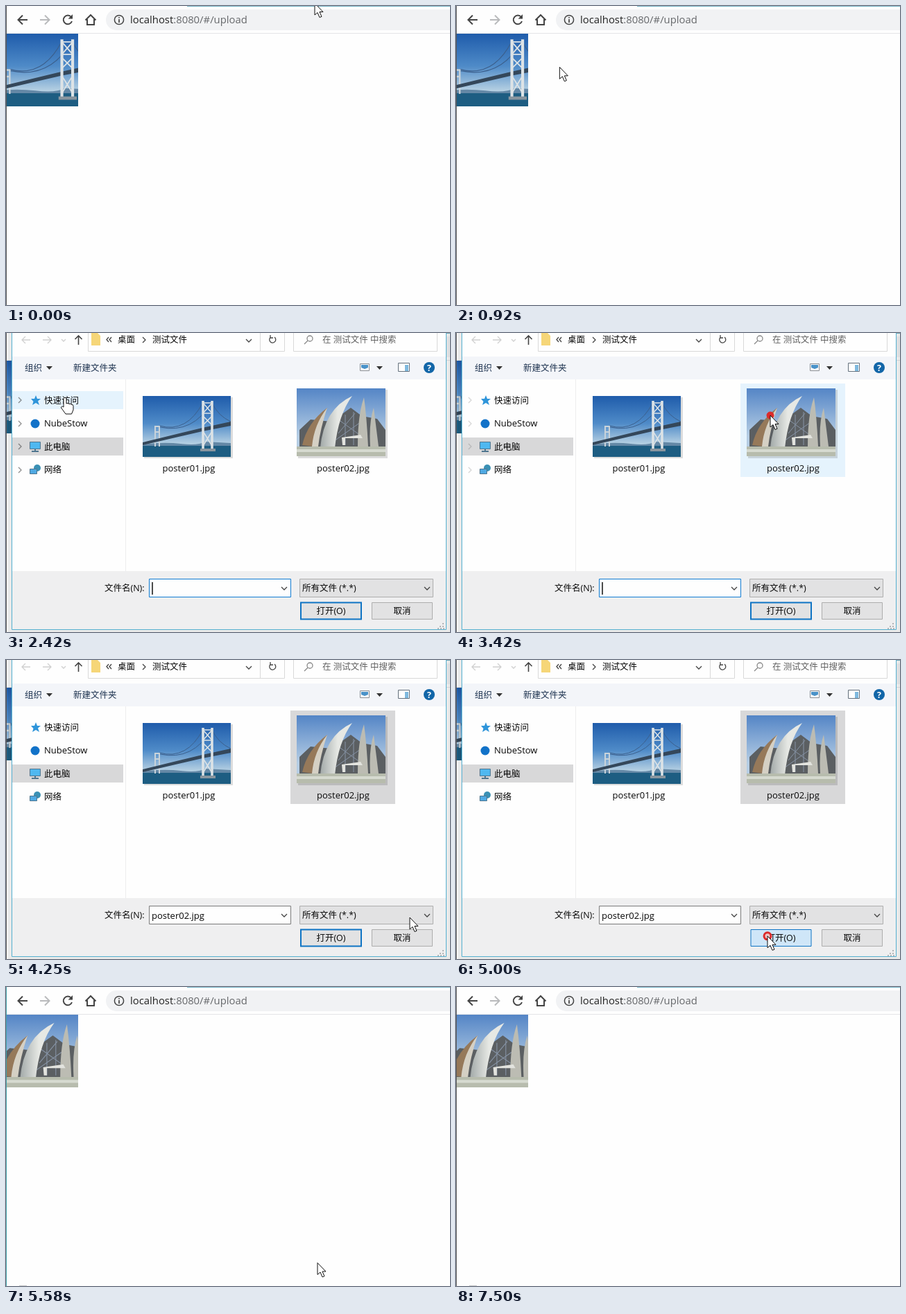
An HTML page for the animation above (7.58 s loop, 640 px wide and 432 px high).

```html
<!DOCTYPE html>
<html lang="zh-CN">
<head>
<meta charset="utf-8">
<title>Upload</title>
<style>
html, body { margin: 0; height: 100%; overflow: hidden; background: #fefefe; }
svg { display: block; }
text { font: 12.5px "Open Sans", "Noto Sans CJK SC", "Noto Sans CJK", sans-serif; fill: #080808; }
.latin { font-size: 13px; }
.line { fill: none; stroke: #444; stroke-width: 1.3; }
.pale { stroke: #d0d0d0; }
.bold { stroke-width: 2; }
.box { fill: #e2e2e3; stroke: #adadad; }
.mid { text-anchor: middle; }
</style>
</head>
<body>
<svg width="640" height="432" viewBox="0 0 640 432">
  <defs>
    <linearGradient id="deepSky" x2="0" y2="1">
      <stop stop-color="#1f5cab"/><stop offset=".45" stop-color="#4f8bc8"/><stop offset=".78" stop-color="#b4cfe2"/>
    </linearGradient>
    <linearGradient id="softSky" x2="0" y2="1">
      <stop stop-color="#5485c6"/><stop offset=".7" stop-color="#b5cde4"/>
    </linearGradient>
    <linearGradient id="sail" x2="1" y2="0">
      <stop stop-color="#a3aaa9"/><stop offset=".55" stop-color="#e6e8e4"/>
    </linearGradient>
    <symbol id="bridge" viewBox="0 0 127 88" preserveAspectRatio="xMidYMid slice">
      <path fill="url(#deepSky)" d="M0 0H127V88H0Z"/>
      <path fill="#6488a6" d="M0 70Q30 66 55 69T90 66L127 68V74H0Z"/>
      <path fill="#1d5d82" d="M0 72H127V88H0Z"/>
      <path fill="none" stroke="#3b5f8c" d="M24 43Q64 54 87 9M25 45Q73 55 99 9M100 10Q109 29 127 37"/>
      <path fill="none" stroke="#c9d3da" stroke-width="2" d="M18 73V43M24 73V43M18 44H24M18 52H24"/>
      <path fill="#34475a" d="M0 67L86 46L127 37V43L86 51L0 71Z"/>
      <path fill="none" stroke="#dde3e6" stroke-width="3.5" d="M87 77V7M100 77V7"/>
      <path fill="none" stroke="#dde3e6" stroke-width="1.5" d="M87 10H100L87 25H100L87 10M87 29L100 42M100 29L87 42M87 51L100 72M100 51L87 72"/>
      <path fill="#88959f" d="M83 76H105V80H83Z"/>
    </symbol>
    <symbol id="hall" viewBox="0 0 128 98" preserveAspectRatio="xMidYMid slice">
      <path fill="url(#softSky)" d="M0 0H128V98H0Z"/>
      <path fill="#5b5f62" d="M4 60L20 45L50 48L78 28L94 40L116 44L128 60V86H4Z"/>
      <path fill="none" stroke="#8794a6" d="M60 45L92 68M60 65L84 36M54 76L92 49M70 38V82M82 34V82"/>
      <path fill="#96795a" d="M8 82Q15 50 44 28Q32 55 24 84Z"/>
      <path fill="#d5d0c4" d="M22 84Q25 52 44 28Q34 58 31 84Z"/>
      <path fill="url(#sail)" d="M34 86Q39 30 80 11Q60 38 55 86Z"/>
      <path fill="#bcbcb3" d="M88 84Q88 38 97 13Q101 42 103 84ZM106 84Q104 48 111 28L118 84Z"/>
      <path fill="#e2e3de" d="M65 71L92 67L95 72H70V82H66Z"/>
      <path fill="#b7bcad" d="M0 84H128V98H0Z"/>
      <path fill="#d6dad0" d="M0 88H128V92H0Z"/>
    </symbol>
    <path id="chevron" class="line" d="M-2-4L2 0L-2 4"/>
    <path id="down" class="line" d="M-4-2L0 2L4-2"/>
    <path id="caretDown" fill="#333" d="M-4-2H5L.5 3Z"/>
  </defs>

  <!-- browser -->
  <path fill="#fefefe" d="M0 0H640V432H0Z"/>
  <path stroke="#78b5c8" d="M261 .5H640"/>
  <path stroke="#e4e5e7" d="M0 39.5H640"/>
  <rect x="144" y="5" width="520" height="30" rx="15" fill="#f1f2f4"/>
  <g class="line bold">
    <path d="M31 20H18M24 13.5L17.5 20L24 26.5"/>
    <path stroke="#b9babc" d="M49 20H62M56 13.5L62.500 20L56 26.5"/>
    <path d="M94 16A6.300 6.300 0 1 0 95 22"/>
    <path d="M114.500 20.500L122 13L129.500 20.500M117 19V27H127V19"/>
    <path d="M163 19V24M163 16V17.500" stroke-width="1.700"/>
    <circle cx="163" cy="20" r="6.600" stroke-width="1.500"/>
  </g>
  <path fill="#444" d="M96 12V18.500H89.500Z"/>
  <text x="179" y="25" style="font-size:14.850px;fill:#222">localhost<tspan fill="#66686b">:8080/#/upload</tspan></text>
  <use id="preview" href="#bridge" x="1" y="40" width="103" height="105"/>
  <path id="edge" d="M.5 0V432"/>
  <path id="status" stroke="#c8c8ca" d="M19 431.500H30"/>

  <!-- file dialog -->
  <g id="dialog">
    <path fill="none" stroke="#000" stroke-opacity=".08" stroke-width="10" d="M8-9H635V429H8Z"/>
    <path fill="#fefefe" stroke="#55b0d0" d="M8.500-9H634.500V428.500H8.500Z"/>
    <path fill="#f3f5f9" d="M9 34H634V67H9Z"/>
    <path fill="#efeff0" d="M9 344H634V428H9Z"/>
    <path class="line" style="stroke:#d9d9d9;stroke-width:1" d="M118.500-2V26.500H401.500V-2M366.500 0V26M414.500-2V26.500H621.500V-2"/>
    <path stroke="#ededee" d="M172.500 67V344"/>
    <path class="line pale" d="M35 10H23M28 5L23 10L28 15M53 10H65M60 5L65 10L60 15M80 9L83 12L86 9"/>
    <path class="line" style="stroke-width:1.600" d="M104.500 17V4M99.500 9L104.500 4L109.500 9"/>
    <path fill="#f6d678" d="M123 0H132L136 4V18H123Z"/>
    <path class="line" d="M148 6L145 9.500L148 13M152 6L149 9.500L152 13"/>
    <use href="#chevron" x="199" y="10"/>
    <use href="#down" x="350" y="11"/>
    <path class="line" d="M387 6A4.500 4.500 0 1 1 381 6.500M381 3V7H385"/>
    <path class="line" style="stroke:#888" d="M435 11L430 16"/>
    <circle class="line" style="stroke:#888" cx="438" cy="8" r="4"/>
    <text x="161" y="14">桌面</text>
    <text x="211" y="14">测试文件</text>
    <text x="456" y="14" style="fill:#606060">在 测试文件 中搜索</text>

    <text x="27" y="55" style="fill:#1e3350">组织</text>
    <use href="#caretDown" x="62" y="50"/>
    <text x="97" y="55" style="fill:#1e3350">新建文件夹</text>
    <path fill="#fff" stroke="#8a8d92" d="M510.500 44.500H523.500V54.500H510.500Z"/>
    <path fill="#4a92c8" d="M512 46H522V50L517 52L512 50Z"/>
    <use href="#caretDown" x="538" y="50"/>
    <path fill="#fff" stroke="#64707c" d="M565.500 43.500H581.500V55.500H565.500Z"/>
    <path fill="#7fb9de" d="M575 46H580V55H575Z"/>
    <circle cx="610" cy="50" r="8" fill="#1266a8"/>
    <text class="mid" x="610" y="54.500" style="fill:#fff;font-weight:700">?</text>

    <path id="rowHover" fill="#e5f3fd" d="M9 84H169V110H9Z"/>
    <path fill="#d8d8d9" d="M9 151H169V177H9Z"/>
    <g id="arrows" stroke-opacity=".6">
      <use href="#chevron" x="20" y="97"/><use href="#chevron" x="20" y="131"/>
      <use href="#chevron" x="20" y="164"/><use href="#chevron" x="20" y="198"/>
    </g>
    <path fill="#2f95da" d="M43 90L45 95L50 95L46 98.500L48 104L43 101L38 104L39.500 99L36 95L41 95Z"/>
    <circle cx="42" cy="131" r="6.500" fill="#1272c8"/>
    <path fill="#4fb8f0" stroke="#50768f" d="M34.500 157.500H49.500V167.500H34.500Z"/>
    <path fill="#50768f" d="M41 168H43V170H47V172H37V170H41Z"/>
    <circle cx="45" cy="195" r="5" fill="#3a90b4"/>
    <path fill="#4fa9e2" stroke="#50768f" d="M34.500 196.500H44.500V203.500H34.500Z"/>
    <text x="55" y="101.500">快速访问</text>
    <text x="55" y="135" class="latin">NubeStow</text>
    <text x="55" y="168.500">此电脑</text>
    <text x="55" y="202">网络</text>

    <path id="tile1" fill="#e5f3fd" d="M188 73H339V208H188Z"/>
    <path id="tile2" d="M410 73H561V208H410Z"/>
    <path fill="#0002" d="M199 93H327V181H199ZM421 82H550V181H421Z"/>
    <use href="#bridge" x="197" y="91" width="127" height="88"/>
    <use href="#hall" x="419" y="80" width="128" height="98"/>
    <text class="mid latin" x="263.500" y="200">poster01.jpg</text>
    <text class="mid latin" x="486" y="200">poster02.jpg</text>

    <text x="142" y="373">文件名(N):</text>
    <path id="field" d="M206.500 355.500H410.500V381.500H206.500Z"/>
    <path id="caret" stroke="#111" stroke-width="1.500" d="M211 360V378"/>
    <text id="fileName" class="latin" x="210" y="374">poster02.jpg</text>
    <use href="#down" x="401" y="369"/>
    <path class="box" d="M423.500 355.500H615.500V381.500H423.500Z"/>
    <text x="427" y="373">所有文件 (*.*)</text>
    <use href="#down" x="607" y="369"/>
    <path id="open" d="M425 389.500H512V413.500H425Z"/>
    <path class="box" d="M527.500 389.500H614.500V413.500H527.500Z"/>
    <text class="mid" x="468.500" y="406">打开(O)</text>
    <text class="mid" x="571" y="406">取消</text>
    <path stroke="#b4b4b6" stroke-width="2" stroke-dasharray="2 2" d="M630 419V427M626 423V427M622 427H632"/>
  </g>

  <!-- pointer -->
  <g id="pointer">
    <circle id="click" r="5"/>
    <path id="arrow" fill="#fff" stroke="#111" d="M0 0V17L4 13.500L7 20.500L10 19.300L7 12.500H12Z"/>
    <path id="hand" fill="#fff" stroke="#111" d="M-2 14V1.500Q0-1.500 2 1.500V9Q4 7.500 6 9.500Q8 8.500 9.500 10.500Q12 10 12 12.500V18L9.500 24H1L-5.500 15Q-5.500 12-2 14Z"/>
    <g id="busy" transform="translate(13 0)">
      <circle r="6" fill="#b4d6ea" stroke="#1c82c4" stroke-width="4"/>
      <path id="spin" fill="none" stroke="#66c0ee" stroke-width="3" d="M0-6A6 6 0 0 1 6 0"/>
    </g>
  </g>
</svg>
<script>
const LOOP = 7580, TICK = 83.33;
const $ = id => document.getElementById(id);
const show = (id, on) => $(id).style.display = on ? '' : 'none';
const paint = (id, fill, stroke, width = 1) => Object.assign($(id).style, { fill, stroke, strokeWidth: width });
const clamp = v => Math.max(0, Math.min(1, v));

// pointer path: tick, x, y
const path = [
  [0, 445, -4], [2, 425, 12], [6, 290, 60], [10, 180, 84], [13, 88, 97], [14, 76, 98], [15, 85, 93],
  [31, 85, 93], [34, 170, 101], [38, 390, 116], [40, 453, 119], [43, 453, 119],
  [47, 555, 235], [50, 588, 345], [51, 582, 372], [54, 510, 397], [57, 449, 399],
  [78, 449, 398], [79, 453, 406], [81, 520, 260], [83, 605, 85], [85, 645, 14], [91, 645, 14]
];
function pointerAt(k) {
  const i = path.findIndex(p => p[0] > k);
  const [a, x, y] = path[i - 1], [b, x2, y2] = path[i];
  const s = (k - a) / (b - a);
  return [x + (x2 - x) * s, y + (y2 - y) * s];
}

function draw(time) {
  const k = Math.floor((time % LOOP + 4) / TICK), t = k * TICK;
  const within = (a, b) => k >= a && k < b;
  const [x, y] = pointerAt(k);
  const inside = (l, top, r, b) => x > l && x < r && y > top && y < b;

  $('preview').setAttribute('href', k < 63 ? '#bridge' : '#hall');
  paint('edge', 'none', within(62, 90) ? '#3f9fa8' : '#555');
  show('status', k >= 64);

  const picked = k >= 43;
  show('dialog', within(25, 62));
  $('dialog').style.opacity = k === 61 ? .4 : clamp((k - 24) * .4);
  show('rowHover', inside(9, 84, 169, 110));
  $('arrows').style.opacity = clamp(1 - (t - 2670) / 1150);
  show('tile1', inside(188, 73, 339, 208));
  show('tile2', picked || inside(410, 73, 561, 208));
  paint('tile2', picked ? '#d8d8d9' : '#e5f3fd', 'none');
  paint('field', '#fefefe', picked ? '#7a7a7a' : '#0f7bd2');
  show('caret', !picked && t >= 2240 && (t - 2240) % 1060 < 530);
  show('fileName', picked);
  const overOpen = inside(425, 389, 512, 414);
  paint('open', overOpen ? '#cfe6f8' : '#e2e2e3', '#0f74c4', overOpen ? 1 : 2);

  const hand = within(13, 19) || within(25, 32);
  const pressed = [17, 41, 59].includes(k), released = [18, 42, 60].includes(k);
  $('pointer').setAttribute('transform', `translate(${x} ${y})`);
  show('arrow', !hand);
  show('hand', hand);
  show('busy', within(19, 25));
  $('spin').setAttribute('transform', `rotate(${k * 50})`);
  show('click', pressed || released);
  paint('click', pressed ? '#dc2a2a' : '#f0c4c4', '#dc2a2a', pressed ? 1 : 3);
}

(function frame() {
  draw(performance.now());
  requestAnimationFrame(frame);
})();
</script>
</body>
</html>
```
